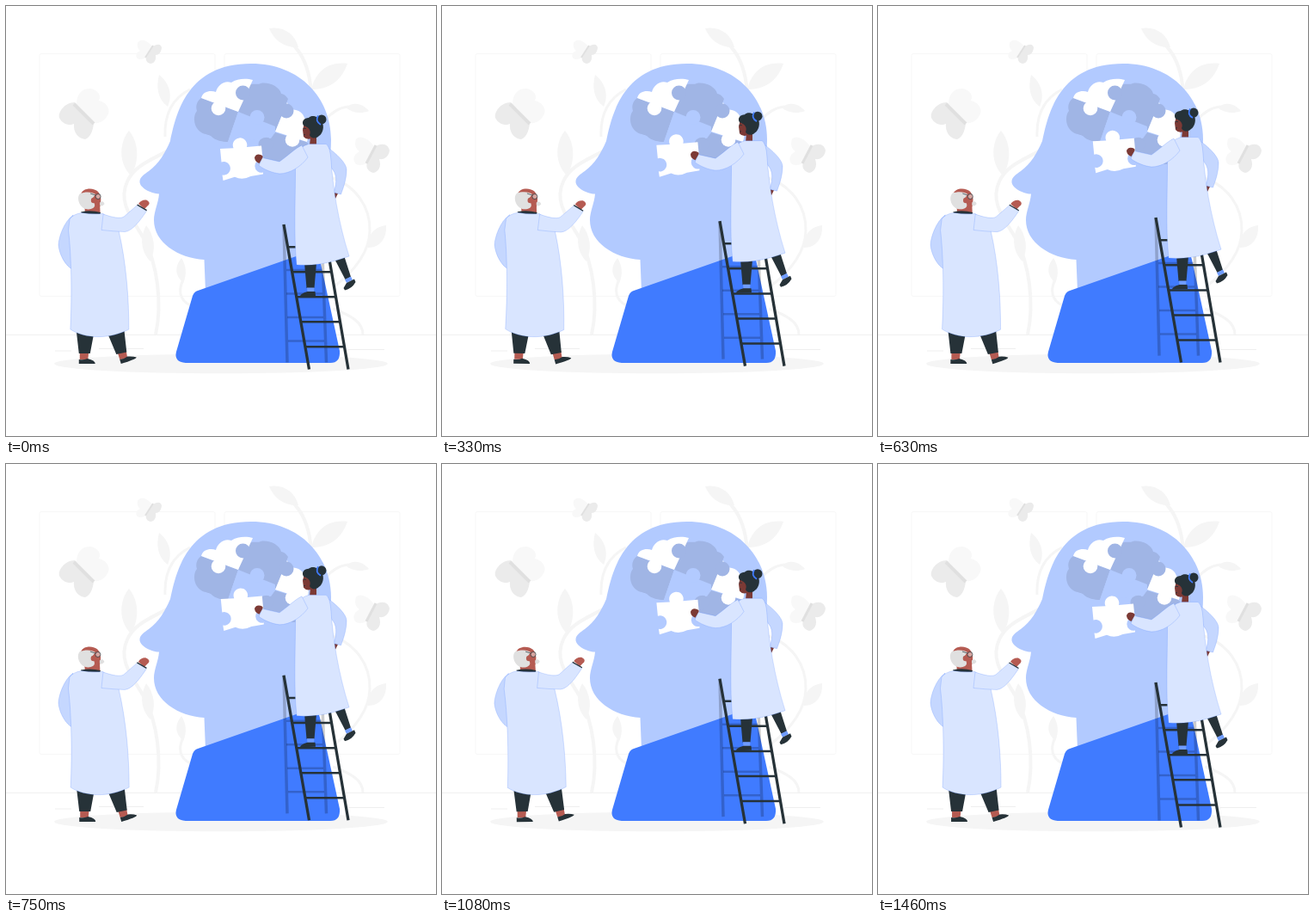
Recreate the animation shown at these times as an HTML page. Size 500 px wide and 500 px high, loop 1500 ms.

```html
<!DOCTYPE html>
<html lang="en">
<head>
<meta charset="utf-8">
<title>Head puzzle</title>
<style>
html, body { margin: 0; width: 100%; height: 100%; overflow: hidden; background: #fff; }
svg { display: block; width: 100vw; height: 100vh; }
.ink { fill: #263238; }
.pale { fill: #b2caff; }
.dim { fill: #a0b5e5; }
.coat { fill: #d9e5ff; stroke: #407bff; stroke-width: .22; stroke-linejoin: round; }
.sleeve { fill: #c5d7ff; }
.blue { fill: #407bff; }
.white { fill: #fff; }
.line { fill: none; stroke-linecap: butt; }
</style>
</head>
<body>
<svg viewBox="0 0 500 500">
  <!-- room -->
  <g class="line" stroke="#f5f5f5" stroke-width=".8">
    <rect x="39" y="55.5" width="204" height="282" rx="2"/>
    <rect x="254" y="55.5" width="204" height="282" rx="2"/>
    <path stroke="#ebebeb" d="M0 382.4H500M57 401H76M108 398.5H160M398 399.5H440"/>
  </g>

  <!-- plants -->
  <g class="line" stroke="#f5f5f5" stroke-width="4">
    <path d="M174 382C182 345 176 300 160 270C146 246 130 228 141 204C150 184 172 178 194 165"/>
    <path stroke-width="3" d="M185 152C184 128 192 108 214 97M206 318C198 335 205 346 220 350"/>
    <path d="M312 29C334 40 354 60 355 106"/>
    <path stroke-width="3" d="M398 117C388 118 378 124 370 134M374 198C408 208 424 235 423 262C422 290 400 312 382 326M380 352C402 360 415 368 415 382"/>
  </g>
  <g fill="#f5f5f5">
    <path d="M143 145C132 158 130 182 145 197C156 180 154 158 143 145Z"/>
    <path d="M178 80C174 95 177 109 188 117C194 104 190 89 178 80Z"/>
    <path d="M163 255C155 270 157 286 168 297C175 282 172 266 163 255Z"/>
    <path d="M204 293C196 303 196 313 206 322C211 311 209 301 204 293Z"/>
    <path d="M306 26C322 23 336 32 340 48C325 49 312 41 306 26Z"/>
    <path d="M397 67C376 64 360 75 355 97C376 97 390 87 397 67Z"/>
    <path d="M395 118C404 111 414 113 422 122C412 126 402 124 395 118Z"/>
    <path d="M442 255C427 257 419 268 421 281C435 281 443 270 442 255Z"/>
  </g>

  <!-- butterflies -->
  <g>
    <path fill="#f8f8f8" d="M82 114C82 100 91 95 99 96C107 98 111 104 108 110C117 112 121 120 119 125C116 132 111 137 102 136Z"/>
    <path fill="#ebebeb" d="M80 112C69 112 60 123 62 130C65 137 74 140 79 137C78 147 84 154 92 155C98 153 101 145 102 137Z"/>
    <path class="line" stroke="#e0e0e0" stroke-width="4" d="M79 114L102 137"/>
  </g>
  <g>
    <path fill="#f8f8f8" d="M170 47C163 38 155 38 153 43C152 47 153 50 156 52C150 54 150 61 155 62C159 62 162 61 163 59Z"/>
    <path fill="#ebebeb" d="M171 47C177 43 181 45 181 49C180 54 178 57 174 57C175 63 172 67 168 67C164 66 162 63 163 60Z"/>
    <path class="line" stroke="#e0e0e0" stroke-width="2" d="M171 46L162 60"/>
  </g>
  <g>
    <path fill="#f8f8f8" d="M428 163C420 152 410 150 407 155C405 160 406 166 411 169C403 173 403 180 407 184C412 186 417 185 420 182Z"/>
    <path fill="#ebebeb" d="M430 163C439 158 445 162 446 168C445 175 440 179 434 178C437 187 433 193 427 194C421 192 418 188 420 182Z"/>
    <path class="line" stroke="#e0e0e0" stroke-width="3" d="M430 162L419 183"/>
  </g>

  <ellipse cx="250" cy="416" rx="194" ry="11.3" fill="#f5f5f5"/>

  <!-- big head -->
  <path class="pale" d="M232 332L230.500 295C200 293 172 275 172 249C172 239 177 230 178 218.500C168 218 155 211 155.500 204C155.500 199 161 195.500 166 192C178 183 185 171 191 157C198 124 211 67 285 67C343 67 378 108 378 155C378 205 358 240 363 300Z"/>
  <path class="blue" d="M223 331L346 288H360Q364 290 365 295L388 401Q389 415 377 415H209Q195 414 198 402L217 337Q219 332 223 331Z"/>

  <!-- brain pieces -->
  <path class="dim" d="M227 107C220 112 221 119 222 122C217 128 219 138 222 142C226 149 234 149 238 151C244 157 252 158 258 158L270 123Z"/>
  <path class="dim" d="M279 93C287 89 292 92 296 90C306 88 318 94 320 102Q324 102 328 108L313 147L270 123Z"/>
  <path class="dim" d="M313 147L349 158C358 166 350 184 338 184C325 184 306 184 300 177L296 166Z"/>
  <circle class="dim" cx="302" cy="161" r="8.500"/>
  <path class="white" d="M227 107C229 99 238 98 244 100C246 92 254 86 262 89C269 84 280 84 287 86L270 123Z"/>
  <circle class="white" cx="247" cy="119" r="8.300"/>
  <circle class="dim" cx="275.500" cy="101" r="8.500"/>
  <path class="white" d="M327 112L330 121C337 119 345 123 347 130C352 137 353 148 350 158L313 146Z"/>
  <circle class="white" cx="333" cy="155.500" r="8.300"/>
  <circle class="dim" cx="326" cy="122" r="8.500"/>
  <path class="pale" d="M270 123L313 140V147L308 154Q302 151 296 155L258 158Z"/>
  <circle class="pale" cx="292" cy="129.500" r="8.500"/>

  <!-- held piece -->
  <g id="piece">
    <path class="white" d="M249 166L264.500 165.200A8.300 8.300 0 1 1 280 164L297 162.500L298.500 178.500A7.700 7.700 0 1 0 299 193.500V195.500L284.500 198Q275 203 266 198.800L252.500 203L251.500 196.500A7.800 7.800 0 1 0 250.500 181.500Z"/>
  </g>

  <g id="climber">
    <!-- ladder with its shadow -->
    <g class="line" stroke="#000" stroke-opacity=".2">
      <path stroke-width="3.500" d="M323 254L327 414.500M368 290L372.500 414.500"/>
      <path stroke-width="2.500" d="M326 307H367M326 334.500H368M327 362H369M328 389.500H370"/>
    </g>
    <g class="line" stroke="#263238">
      <path stroke-width="3.300" d="M323 254L352.500 422.500M369 254L398 422.500"/>
      <path stroke-width="2.500" d="M327 280.200H373M332 309.200H379M337 338.300H384M342 367.300H389M347 396.400H394"/>
    </g>

    <!-- legs -->
    <path class="ink" d="M347 299H361L358.500 328H349.500ZM382 294L393 290L401 315L394.500 318Z"/>
    <path fill="#6f9cff" d="M350 327.500H358.500L358 333H350.500ZM394 318L401 314.500L403 318.500L396 322Z"/>
    <path class="ink" d="M350.500 332H359.500L360 337L342 337.500Q342 334.500 350.500 332ZM396 322L405 317.500L406.500 321Q402 329 394 330.500L392.500 328Z"/>

    <!-- far arm, coat, near arm -->
    <path fill="#7c3a35" d="M382 215L386 218L383 224L379 225Z"/>
    <path class="coat sleeve" d="M373 164C384 171 396 183 396 190C396 202 392 212 389.500 219L381 217C385 205 385 195 378 188Z"/>
    <path fill="#7c3a35" d="M354 152H361V162H353Z"/>
    <path class="coat" d="M336.500 176Q341 163 352 160.500H372Q377 163 378 180C380 210 386 250 399 291C384 296 365 303 338 301C334 265 337 220 336.500 176Z"/>
    <path class="coat" d="M351 176C343 187 330 195 318 195C309 194 300 190 294 185.500L298 176.500L318 181C328 174 337 165 344 162Z"/>
    <path fill="#7c3a35" d="M298 177L294.500 183Q289 181 289 176Q291 171.500 296 173Q300 174 298 177Z"/>

    <!-- face and hair -->
    <path fill="#7c3a35" d="M347 136L345 144L346 152Q350 157 358 153L359 138Z"/>
    <path class="ink" d="M346 139C343 134 347 130 352 130C356 126 364 129 367 134C371 140 368 149 364 151C360 155 354 154 353 150C355 146 353 141 346 139Z"/>
    <circle class="ink" cx="367" cy="132" r="5.500"/>
    <path class="line" stroke="#407bff" stroke-width="1.800" d="M363 127.500Q359 134 366 138"/>
    <path class="line" stroke="#263238" stroke-width=".8" d="M345.500 142.500H349M346 150L348 149.500"/>
  </g>

  <g id="elder">
    <!-- legs -->
    <path fill="#b55b52" d="M86 402H96.500L95.500 411H86ZM130 403L140 401L141.500 410L132.500 411Z"/>
    <path class="ink" d="M82 378L102.500 380L98 404H85ZM118 380L137.500 376L140.500 402.500L128.500 405Z"/>
    <path class="ink" d="M85 411Q90 412 95 410Q104 412 104 416H85ZM132.500 411Q138 410.500 141.500 407.500Q148 407 152 408.500Q151 411 134 416Z"/>

    <!-- coat and head -->
    <path class="coat sleeve" d="M78 243C67 251 61 270 61 278C62 290 70 303 77 306Z"/>
    <path fill="#b55b52" d="M91 231L109 230L109.500 241H92Z"/>
    <path class="ink" d="M87 239.500Q98 237 110 240L109 243H89Z"/>
    <path class="coat" d="M74 248Q78 242 88 240.500Q100 242.500 113 241.500L131 261C140 300 143 340 143 376C120 388 92 387 75 376C77 335 76 290 72.500 261Z"/>
    <path fill="#b55b52" d="M154 230Q157 225 163 225.500Q168 228 166 231L161 236Z"/>
    <path class="coat" d="M113 242C124 246 133 247.500 137 245L152.500 231.500L163.500 238C157 248 147 262 138 262.500Q125 262 111 260.500Z"/>
    <path class="line" stroke="#263238" stroke-width="1.300" d="M152.500 231L163.500 237.500"/>
    <path fill="#b55b52" d="M87 219C89 211 102 211 107 216Q111 221 110 228Q110 237 103 238Q93 238 89 228Z"/>
    <path fill="#e0e0e0" d="M86 218C92 215.500 101 216 104 219L101 223L103 231C104 236 95 238 90 235C84 231 82 222 86 218ZM109 228.500Q113 225.500 114.500 230Q112 234 109 231.500Z"/>
    <circle cx="102" cy="226" r="3.300" fill="#b55b52"/>
    <path class="line" stroke="#263238" stroke-width=".7" d="M98 218L104 220"/>
    <circle cx="107" cy="221.500" r="3" fill="#fff" fill-opacity=".45" stroke="#263238" stroke-width=".7"/>
  </g>
</svg>
<script>
const LOOP = 1500, LEAD = 30;
const part = id => document.getElementById(id);
const piece = part('piece'), climber = part('climber'), elder = part('elder');

function draw(now) {
  const angle = (now + LEAD) % LOOP / LOOP * 2 * Math.PI;
  const lift = (1 - Math.cos(angle)) / 2;
  climber.setAttribute('transform', `translate(0 ${-8.2 * lift})`);
  piece.setAttribute('transform', `translate(${0.8 * lift} ${-9 * lift})`);
  elder.setAttribute('transform', `rotate(${0.8 * Math.sin(angle)} 105 285)`);
}

const start = performance.now();
function tick() {
  draw(performance.now() - start);
  requestAnimationFrame(tick);
}
tick();
</script>
</body>
</html>
```
